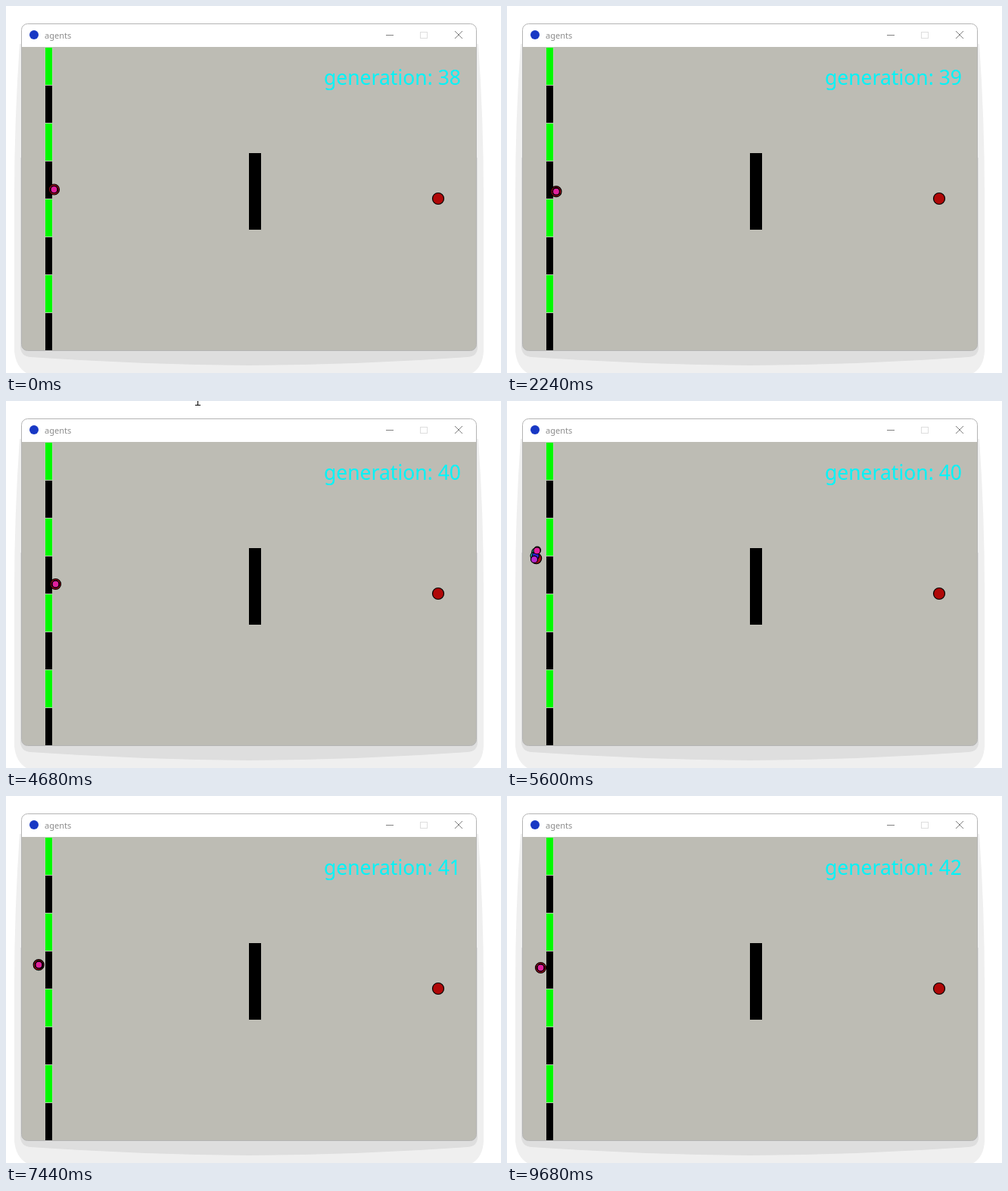
An HTML page with a canvas for the animation above (9.72 s loop, 654 by 484 pixels).

```html
<!DOCTYPE html>
<html lang="en">
<head>
<meta charset="utf-8">
<title>agents</title>
<style>
  html, body { margin: 0; width: 100%; height: 100%; overflow: hidden; background: #fff; }
  canvas { display: block; }
</style>
</head>
<body>
<canvas id="stage" width="654" height="484"></canvas>
<script>
const ctx = document.getElementById('stage').getContext('2d');
const LOOP = 9720, STEP = 40;
const GENERATION = 2340;   // lifetime of one generation
const FIRST_AGE = 450;     // age of the first generation when the loop starts

// Waypoints of the swarm: age, x, y
const shortPath = [[0, 70, 254], [450, 63.5, 242], [770, 44.5, 226.5], [1150, 36, 227],
                   [1510, 40.5, 227.5], [1690, 40.5, 225.5], [2340, 33, 190]];
const longPath = [[0, 70, 254], [450, 65.5, 241.5], [770, 44.5, 226.5], [1400, 37, 202],
                  [1870, 36, 183], [2090, 31, 160], [2340, 30, 145]];

// Colour, radius, then the drift of each agent within the two scattering generations
const agents = [
  ['#a80c1c', 7, [3, 10], [-2, 1]],
  ['#f08030', 4.5, [6, -15], [4, 2]],
  ['#58d858', 4.5, [-1, -3], [1, -4]],
  ['#18c088', 4.5, [0, -10], [2, -1]],
  ['#2878d8', 4.5, [1, 3], [14, 9]],
  ['#18e0e8', 4.5, [-4, 2], [-5, 2]],
  ['#3020e0', 4.5, [1, 2], [11, 4]],
  ['#b828d0', 4.5, [-3, 13], [-2, -4]],
  ['#e0209c', 4.5, [5, -13], [1, 1]]
];

// Path, age at which the drift is complete, index of the drift in an agent
const still = { path: shortPath };
const generations = [still, still,
  { path: longPath, spreadAge: 2090, drift: 2 },
  { path: longPath, spreadAge: 1870, drift: 3 }, still];

function rect(x, y, w, h, color) {
  ctx.fillStyle = color;
  ctx.fillRect(x, y, w, h);
}

function disc(x, y, r, fill, outline) {
  ctx.beginPath();
  ctx.arc(x, y, r, 0, Math.PI * 2);
  ctx.fillStyle = fill;
  ctx.fill();
  if (outline) {
    ctx.strokeStyle = outline;
    ctx.lineWidth = 1.2;
    ctx.stroke();
  }
}

function line(color, ...points) {
  ctx.beginPath();
  for (let i = 0; i < points.length; i += 4) {
    ctx.moveTo(points[i], points[i + 1]);
    ctx.lineTo(points[i + 2], points[i + 3]);
  }
  ctx.strokeStyle = color;
  ctx.lineWidth = 1;
  ctx.stroke();
}

function text(str, x, y, size, color) {
  ctx.font = `${size}px "Noto Sans", sans-serif`;
  ctx.fillStyle = color;
  ctx.fillText(str, x, y);
}

function along(path, age) {
  const i = Math.max(1, path.findIndex(p => p[0] >= age));
  const a = path[i - 1], b = path[i];
  const k = (age - a[0]) / (b[0] - a[0]);
  return [a[1] + (b[1] - a[1]) * k, a[2] + (b[2] - a[2]) * k];
}

function drawShadow() {
  ctx.fillStyle = '#efefef';
  ctx.fill(new Path2D('M18 50Q11 150 11 250V455Q13 476 27 484H616Q630 476 631 455V250Q631 150 624 50Z'));
  ctx.fillStyle = '#dedede';
  ctx.fill(new Path2D('M19 200V450Q20 462 32 463Q180 473 321 474Q470 473 610 463Q623 462 623 450V200Z'));
}

function drawWindow() {
  ctx.beginPath();
  ctx.roundRect(20.5, 23.5, 601, 431, 8);
  ctx.fillStyle = '#fff';
  ctx.fill();
  ctx.save();
  ctx.clip();
  rect(20, 54, 602, 401, '#bdbcb4');
  ctx.restore();
  ctx.strokeStyle = '#b4b4b4';
  ctx.lineWidth = 1;
  ctx.stroke();

  disc(37, 38, 6, '#1838c4');
  text('agents', 51, 43, 11, '#8c8c8c');
  line('#808080', 502, 38.5, 512, 38.5);
  ctx.strokeStyle = '#dedede';
  ctx.strokeRect(547.5, 34.5, 9, 8);
  line('#808080', 593, 33, 603, 43, 603, 33, 593, 43);
}

function drawCourse() {
  for (let y = 55; y < 455; y += 100) {
    rect(51, y - 1, 11, 51, '#b8d0b0');
    rect(52, y, 9, 49, '#00f900');
    rect(52, y + 50, 9, 49, '#000');
  }
  rect(321, 194, 16, 101, '#000');
  disc(571, 254, 7.5, '#b00808', '#000');
}

function drawAgents({ path, spreadAge, drift }, age) {
  const [x, y] = along(path, age);
  const spread = drift ? Math.max(0, (age - 800) / (spreadAge - 800)) : 0;
  ctx.save();
  ctx.beginPath();
  ctx.rect(21, 54, 600, 400);
  ctx.clip();
  for (const agent of agents) {
    const [dx, dy] = drift ? agent[drift] : [0, 0];
    disc(x + dx * spread, y + dy * spread, agent[1], agent[0], '#000');
  }
  ctx.restore();
}

function draw(t) {
  const index = Math.floor((t + FIRST_AGE) / GENERATION);
  rect(0, 0, 654, 484, '#fff');
  drawShadow();
  drawWindow();
  drawCourse();
  drawAgents(generations[index], (t + FIRST_AGE) % GENERATION);
  text('generation: ' + (38 + index), 420, 104, 26.5, '#00f4f8');
  if (t >= 4600 && t < 4800) line('#000', 253.5, 0, 253.5, 5, 250, 5.5, 257, 5.5);
}

function tick() {
  const t = performance.now() % LOOP;
  draw(Math.floor(t / STEP) * STEP);
  requestAnimationFrame(tick);
}
tick();
</script>
</body>
</html>
```
